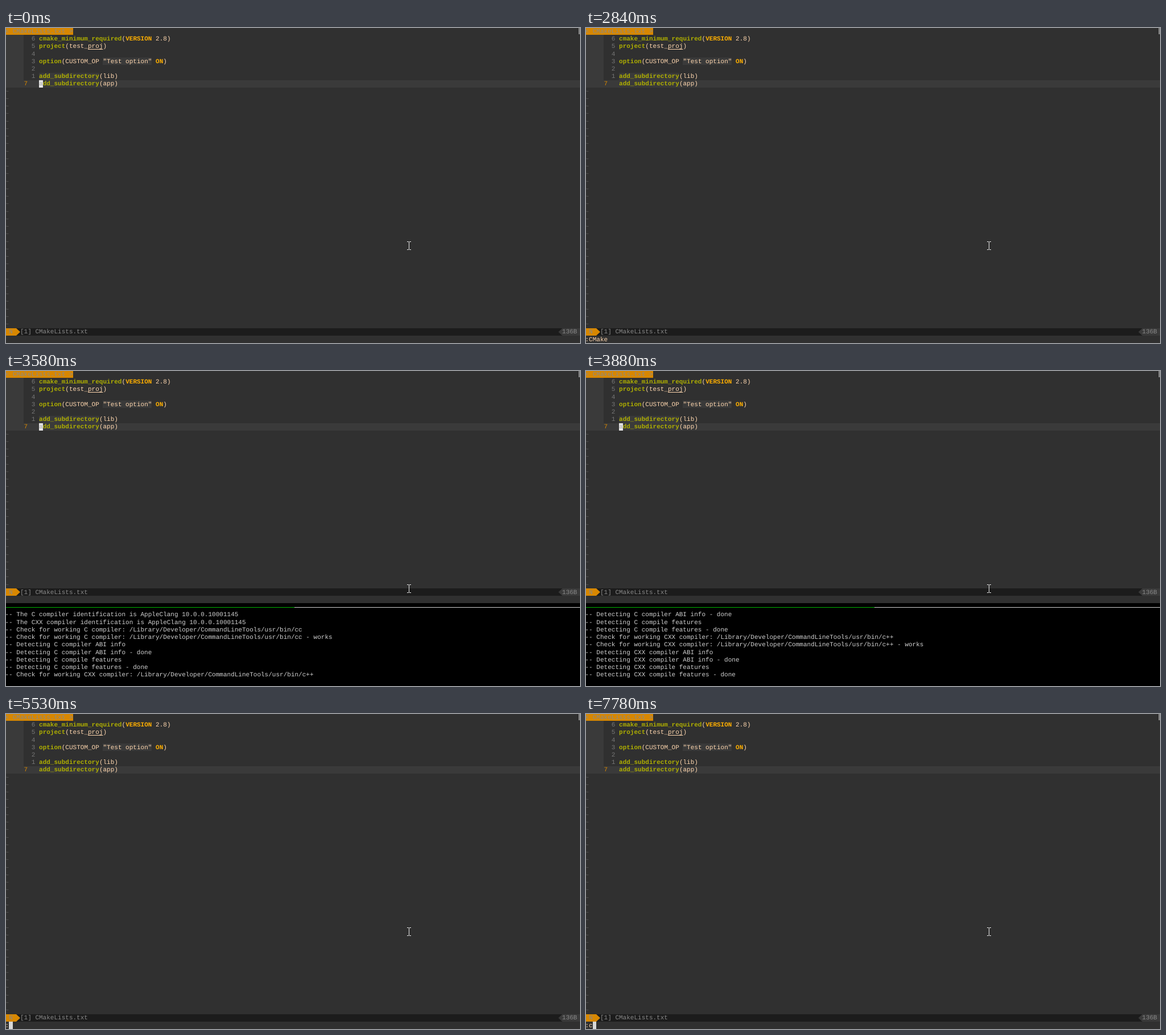
An HTML page with a canvas for the animation above (8000 ms loop, 1009x555 px).

```html
<!DOCTYPE html>
<html lang="en">
<head>
<meta charset="utf-8">
<title>CMake in the editor</title>
<style>
html, body { margin: 0; width: 100%; height: 100%; overflow: hidden; background: #303030; }
canvas { display: block; }
</style>
</head>
<body>
<canvas id="stage" width="1009" height="555"></canvas>
<script>
const ctx = document.getElementById('stage').getContext('2d');
const W = 1009, H = 555, LOOP = 8000;
const CELL = 6.615, LINE = 13.24, LEFT = -1.5, TOP = -0.8;
const BG = '#303030', RAISED = '#3a3a3a', BAR = '#1c1c1c', ORANGE = '#d78700';
const GREY = '#8a8a8a', DIM = '#767676', TEXT = '#ffd7af', OLIVE = '#afaf00';
const AMBER = '#ffaf00', OUTPUT = '#d0d0d0', CURSOR = '#e4e4e4';

// Command line: [start, text, cursor shown]; null text means normal mode
const steps = [
  [0, null], [750, ':', 1], [1050, ':C', 1], [1350, ':CM', 1], [1500, ':CMa', 1],
  [2400, ':CMake', 1], [2840, ':CMake', 0], [2990, null],
  [5530, ':', 1], [5980, ':c', 1], [6580, ':co', 1], [7330, ':c', 1],
  [7480, ':', 1], [7780, ':c', 1]
];

// Terminal pane: [start, number of lines printed]
const PANE_OPEN = 2990, PANE_CLOSE = 4030, PANE_ROWS = 9;
const printed = [[2990, 0], [3290, 2], [3440, 5], [3580, 9], [3730, 11], [3880, 14]];

const identify = lang => `The ${lang} compiler identification is AppleClang 10.0.0.10001145`;
const checks = (lang, bin) => {
  const check = `Check for working ${lang} compiler: /Library/Developer/CommandLineTools/usr/bin/${bin}`;
  const abi = `Detecting ${lang} compiler ABI info`;
  const features = `Detecting ${lang} compile features`;
  return [check, check + ' - works', abi, abi + ' - done', features, features + ' - done'];
};
const log = [identify('C'), identify('CXX'), ...checks('C', 'cc'), ...checks('CXX', 'c++')];

const at = (list, t) => list.filter(item => item[0] <= t).pop();
const colX = col => LEFT + col * CELL;
const rowY = row => Math.round(TOP + row * LINE);

function rect(x, y, w, h, color) {
  ctx.fillStyle = color;
  ctx.fillRect(x, y, w, h);
}

function cells(col, row, count, color) {
  const x = Math.round(colX(col));
  rect(x, rowY(row), Math.round(colX(col + count)) - x, rowY(row + 1) - rowY(row), color);
}

function text(str, col, row, color, bold) {
  ctx.font = `${bold ? 'bold ' : ''}11.025px "Liberation Mono", monospace`;
  ctx.fillStyle = color;
  ctx.fillText(str, colX(col), Math.round(TOP + row * LINE + 9.6));
}

// Draws [text, colour, bold] pieces one after another
function line(row, ...parts) {
  let col = 9;
  for (const [str, color = TEXT, bold] of parts) {
    text(str, col, row, color, bold);
    col += str.length;
  }
}

function triangle(x1, x2, row, color) {
  const y = rowY(row), end = rowY(row + 1);
  ctx.fillStyle = color;
  ctx.beginPath();
  ctx.moveTo(x1, y);
  ctx.lineTo(x2, (y + end) / 2);
  ctx.lineTo(x1, end);
  ctx.fill();
}

function drawCode(t, normal) {
  cells(0, 0, 18, ORANGE);
  text('< CMakeLists.txt >', 0, 0, GREY);

  rect(0, rowY(1), 31, rowY(8) - rowY(1), RAISED);
  rect(0, rowY(7), W, rowY(8) - rowY(7), RAISED);
  cells(26, 4, 13, RAISED);
  if (t < PANE_CLOSE) cells(9, 6, 16, RAISED);

  for (let row = 1; row < 7; row++) text(String(7 - row), 7, row, DIM);
  text('7', 5, 7, ORANGE);

  const key = name => [name, OLIVE, true];
  line(1, key('cmake_minimum_required'), ['('], ['VERSION', AMBER, true], [' 2.8)']);
  line(2, key('project'), ['(test_proj)']);
  rect(colX(22), rowY(3) - 2, 4 * CELL, 1, TEXT);
  line(4, key('option'), ['(CUSTOM_OP "Test option" '], ['ON', AMBER, true], [')']);
  line(6, key('add_subdirectory'), ['(lib)']);
  line(7, key('add_subdirectory'), ['(app)']);
  if (normal) {
    cells(9, 7, 1, CURSOR);
    text('a', 9, 7, '#bcbcbc', true);
  }
}

function drawStatus(row) {
  for (let r = 8; r < row; r++) text('~', 0, r, '#585858');
  const y = rowY(row), h = rowY(row + 1) - y;
  rect(0, y, W, h, BAR);
  rect(0, y, 18, h, ORANGE);
  triangle(18, 25, row, ORANGE);
  text('N', 1, row, GREY);
  text('[1] CMakeLists.txt', 4, row, GREY);
  triangle(978, 971, row, RAISED);
  rect(978, y, W - 978, h, RAISED);
  text('136B', 148, row, GREY);
}

function drawPane(t) {
  rect(0, 409, W, H - 409, '#000');
  rect(0, 416, 507, 1, '#00b400');
  rect(507, 416, W - 507, 1, OUTPUT);
  const count = at(printed, t)[1];
  log.slice(Math.max(0, count - PANE_ROWS), count)
    .forEach((str, i) => text('-- ' + str, 0, 32 + i, OUTPUT));
}

function drawPointer() {
  rect(708, 378, 1, 11, '#e8e8e8');
  for (const y of [376, 390]) {
    rect(705, y, 3, 1, '#e8e8e8');
    rect(709, y, 3, 1, '#e8e8e8');
  }
  rect(708, 377, 1, 1, '#e8e8e8');
  rect(708, 389, 1, 1, '#e8e8e8');
}

function draw(t) {
  const [, command, cursor] = at(steps, t);
  const pane = t >= PANE_OPEN && t < PANE_CLOSE;
  ctx.textRendering = 'geometricPrecision';
  rect(0, 0, W, H, BG);
  drawCode(t, command === null);
  drawStatus(pane ? 29 : 40);
  if (pane) drawPane(t);
  if (command) {
    text(command, 0, 41, TEXT);
    if (cursor) cells(command.length, 41, 1, '#d8d8d8');
  }
  rect(1007, 0, 1, 11, '#e8e8e8');
  drawPointer();
}

const start = performance.now();
function frame() {
  draw((performance.now() - start) % LOOP);
  requestAnimationFrame(frame);
}
frame();
</script>
</body>
</html>
```
